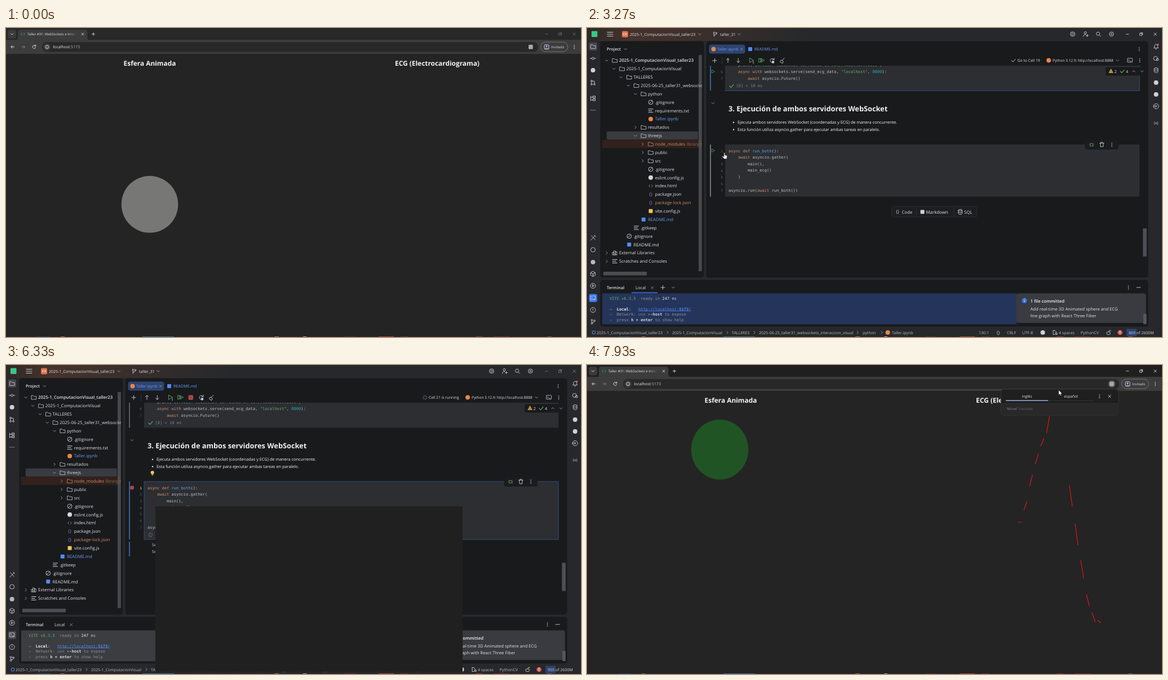
These frames come from a looping animation (1020 by 549 pixels, 8000 ms). An HTML page:

```html
<!DOCTYPE html>
<html lang="es">
<head>
<meta charset="utf-8">
<title>Taller</title>
<style>
html, body { margin: 0; width: 100%; height: 100%; overflow: hidden; background: #242424; }
svg { display: block; width: 100vw; height: 100vh; }
text { font-family: "Open Sans", "Noto Sans", sans-serif; text-rendering: geometricPrecision; white-space: pre; }
.m { font-family: "DejaVu Sans Mono", "Noto Sans Mono", monospace; }
</style>
</head>
<body>
<svg id="stage" viewBox="0 0 1020 549" preserveAspectRatio="none"></svg>
<script>
const FG = '#dfe1e5', DIM = '#ced0d6', BLUE = '#6b9bfa', ORANGE = '#cf8e6d', GREY = '#6f737a', GREEN = '#5fad65';
const EDGE = '#35619b', CELL = '#2c2e32', SELECT = '#25345a', NUM = '#5c6068';

// Drawing helpers
const R = (x, y, w, h, fill, r = 0, more = '') =>
  `<rect x="${x}" y="${y}" width="${w}" height="${h}" rx="${r}" fill="${fill}" ${more}/>`;
const P = (d, c = DIM, w = 0.9, fill = 'none', more = '') =>
  `<path d="${d}" stroke="${c}" stroke-width="${w}" fill="${fill}" stroke-linecap="round" stroke-linejoin="round" ${more}/>`;
const C = (x, y, r, fill, more = '') => `<circle cx="${x}" cy="${y}" r="${r}" fill="${fill}" ${more}/>`;
const ring = (x, y, r, c = DIM) => C(x, y, r, 'none', `stroke="${c}" stroke-width=".9"`);
const T = (x, y, s, size = 7.1, fill = FG, more = '') =>
  `<text x="${x}" y="${y}" font-size="${size}" fill="${fill}" ${more}>${s}</text>`;
const B = 'font-weight="600"', MID = 'text-anchor="middle"';
const G = (id, body, more = '') => `<g id="${id}" ${more}>${body}</g>`;
// Code line: "text|colour" runs
const M = (x, y, ...runs) => T(x, y, runs.map(r => {
  const [s, c] = r.split('|');
  return `<tspan fill="${c || '#bcbec4'}">${s}</tspan>`;
}).join(''), 7.07, FG, 'class="m"');

// Icons
const chev = (x, y, dir = 'down', c = '#9da0a8') => P({
  down: `M${x - 2.3} ${y - 1}l2.3 2.3 2.3-2.3`,
  up: `M${x - 2.3} ${y + 1}l2.3-2.3 2.3 2.3`,
  right: `M${x - 1} ${y - 2.3}l2.3 2.3-2.3 2.3`
}[dir], c);
const cross = (x, y, r, c = DIM, w = 0.8) => P(`M${x - r} ${y - r}l${2 * r} ${2 * r}m0 ${-2 * r}l${-2 * r} ${2 * r}`, c, w);
const plus = (x, y, r, c = DIM) => P(`M${x - r} ${y}h${2 * r}M${x} ${y - r}v${2 * r}`, c);
const dots = (x, y, c = DIM, gap = 2.8) => [-gap, 0, gap].map(d => C(x, y + d, 0.8, c)).join('');
const check = (x, y) => P(`M${x - 3.5} ${y}l2.5 2.6 4.6-5.2`, GREEN, 1.1);
const folder = (x, y, c = DIM) => P(`M${x - 4} ${y - 3.2}h3l1.4 1.4h4v5.2h-8.4z`, c, 0.8);
const ban = (x, y, c = DIM) => ring(x, y, 3.9, c) + P(`M${x - 2.4} ${y + 2.4}l4.8-4.8`, c);
const lines = (x, y, c = DIM) => P(`M${x - 4} ${y - 3}h8m-8 3h6m-6 3h8`, c, 1);
const shelf = (x, y) => P(`M${x - 4} ${y - 1}h2.500v4.500h-2.500zm2.500-2.500h2.800v7h-2.800zm2.800 1.500h2.500v5.500h-2.500z`, DIM, 0.8);
const braces = (x, y, c = '#a571e6') => T(x, y + 2.6, '{}', 8, c, MID);
const angle = (x, y, c = GREEN) => P(`M${x - 1.3} ${y - 2.1}l-2.2 2.1 2.2 2.1m2.6-4.2l2.2 2.1-2.2 2.1`, c);
const logo = c => (x, y) => R(x - 3.5, y - 3.5, 7, 7, c, 1);
const disc = c => (x, y) => C(x, y, 4, c);
const book = disc('#e8864a'), mark = logo('#548af7');
const db = (x, y) => P(`M${x - 3.3} ${y - 3}c0-2 6.6-2 6.6 0v6c0 2-6.6 2-6.6 0zc0 2 6.6 2 6.6 0m-6.6 3c0 2 6.6 2 6.6 0`);
const play = (x, y, r = 3.4, c = GREEN) => P(`M${x - r * .8} ${y - r}v${2 * r}l${r * 1.8} ${-r}z`, c);
const gutterPlay = y => play(223.5, y, 2.7, '#4b8a50');
const stop = (x, y, s) => R(x, y, s, s, '#a5444a', 1, 'stroke="#c75450" stroke-width=".8"');
const restart = x => P(`M${x} 56a3.500 3.500 0 1 0 .3 3M${x + .5} 53.500v2.800h-2.800`) + R(x - 3.5, 58.5, 4, 4, DIM);
const brush = x => P(`M${x} 53.500l-4 4m-3.500 2.500l4 3 2-3.500-3.500-2.500z`);
const spin = (id, x, y) => G(id, C(0, 0, 3, 'none', 'stroke="#8c9097" stroke-width="2.2" stroke-dasharray=".7 1.656"'),
  `data-at="${x},${y}"`);
const winButtons = (id, y) => G(id, P(`M956.4 ${y}h4.6M980.8 ${y - 1.4}h3.6v3.6h-3.6zm1.2-1.2h3.6v3.6`, 'currentColor', 0.8)
  + cross(1008, y, 2.3, 'currentColor'), 'color="#6f6f6f"');

// Browser window
function browser() {
  const heart = [279, 279.5, 257, 243, 214.5, 195, 176, 157.5, 143, 130.5, 121, 90, 74, 62, 56, 54, 62, 84,
    214, 251, 282, 320, 347, 379, 408, 428, 440, 456, 453.5, 458];
  let ecg = '';
  for (let i = 0; i < heart.length; i += 2)
    ecg += P(`M${765 + i * 5.04} ${heart[i]}L${770.2 + i * 5.04} ${heart[i + 1]}`, '#f01414', 1.1);
  return R(0, 0, 1020, 549, '#242424')
    + R(0, 0, 1020, 24, '#282828', 0, 'id="frame"')
    + R(3, 3, 15, 15.5, '#3a3a3a', 4) + chev(10.6, 10.7, 'down', '#eee')
    + R(0, 21, 1020, 25, '#3c3c3c')
    + `<path d="M17 21.5q4 0 4-4V8q0-5 5-5h113.500q5 0 5 5v9.500q0 4 4 4z" fill="#3c3c3c"/>`
    + angle(30, 10.7, '#2fb344')
    + T(38, 13, 'Taller #31: WebSockets e Inters', 6.05, 'url(#fade)')
    + cross(136, 10.8, 1.9, '#eee') + plus(155, 10.8, 2.5, '#ddd') + winButtons('bw', 10.8)
    + P('M14.500 33.500h-5.500m2.500-2.600l-2.600 2.600 2.600 2.600', '#e4e4e4')
    + P('M28 33.500h5.500m-2.500-2.600l2.600 2.600-2.600 2.600', '#858585')
    + P('M52.300 31.700a2.900 2.900 0 1 0 .5 2.600M52.700 30v2.200h-2.200', '#e4e4e4')
    + R(64, 25, 880, 17.5, '#282828', 8.7)
    + C(72.8, 33.7, 6.3, '#3c3c3c') + ring(72.8, 33.7, 3.1, '#ddd') + P('M72.800 33.500v1.700m0-3.200v.1', '#ddd', 0.8)
    + T(83.3, 36.2, 'localhost<tspan fill="#b5b5b5">:5173</tspan>', 7.1, '#ececec')
    + C(931, 33.5, 6.5, '#555', 'id="chip"') + R(927, 29.8, 7.6, 7.6, '#a9a9a9', 1)
    + R(948.5, 25, 48, 17, 'none', 8.5, 'stroke="#858585" stroke-width=".8"')
    + R(955, 29.7, 8, 8, 'none', 1.2, 'stroke="#b8d3f5" stroke-width="1"')
    + C(959, 32.6, 1.4, '#b8d3f5') + P('M956.500 36.700q2.500-2.700 5 0', '#b8d3f5')
    + T(967, 35.8, 'Invitado', 6.2, '#dadada') + dots(1008, 33.6, '#ddd')
    + T(255, 67.2, 'Esfera Animada', 11.9, '#f4f4f4', MID + ' font-weight="700"')
    + T(765, 67.2, 'ECG (Electrocardiograma)', 11.9, '#f4f4f4', MID + ' font-weight="700"')
    + '<ellipse id="ball"/>' + G('ecg', ecg)
    + G('popup', R(734.5, 43, 208.5, 46.500, '#1f1f1f', 5, 'stroke="#3b3b3b" stroke-width=".7"')
      + `<path d="M735 68.500h207.700V85q0 4.300-4.300 4.300H739q-4 0-4-4.300z" fill="#282828"/>` + R(735, 68, 208, .6, '#3b3b3b')
      + R(818, 63.2, 81, .6, '#444') + R(743, 62.500, 75, 1.300, '#a8c7fa')
      + T(780.5, 58, 'inglés', 6.6, '#e8e8e8', MID) + T(858.5, 58, 'español', 6.6, '#e8e8e8', MID)
      + dots(909, 55.6) + cross(927, 55.6, 2.1, '#eee')
      + T(745, 79.8, 'Mirvel <tspan fill="#666">Translate</tspan>', 6.2, '#8a8a8a'));
}

// Project tree rows: depth, arrow, icon, label, colour
const TREE = [
  [0, 'down', folder, '2025-1_ComputacionVisual_taller23'], [1, 'down', folder, '2025-1_ComputacionVisual'],
  [2, 'down', folder, 'TALLERES'], [3, 'down', folder, '2025-06-25_taller31_websockets'],
  [4, 'down', folder, 'python'], [5, '', ban, '.gitignore'], [5, '', lines, 'requirements.txt'],
  [5, '', book, 'Taller.ipynb', BLUE], [4, 'right', folder, 'resultados'], [4, 'down', folder, 'threejs'],
  [5, 'right', folder, 'node_modules <tspan fill="#7d6a60">library root</tspan>', ORANGE],
  [5, 'right', folder, 'public'], [5, 'right', folder, 'src'], [5, '', ban, '.gitignore'],
  [5, '', disc('#d5d7dc'), 'eslint.config.js'], [5, '', angle, 'index.html'], [5, '', braces, 'package.json'],
  [5, '', braces, 'package-lock.json', ORANGE], [5, '', logo('#f2c55c'), 'vite.config.js'],
  [4, '', mark, 'README.md', BLUE], [3, '', lines, '.gitkeep'], [2, '', ban, '.gitignore'],
  [2, '', mark, 'README.md'], [0, 'right', shelf, 'External Libraries'], [0, 'right', lines, 'Scratches and Consoles']
];

function tree() {
  const rows = TREE.map(([d, arrow, icon, label, c = FG], i) => {
    const x = 57 + 12.75 * d, y = 57.6 + 14.87 * i;
    return (arrow ? chev(x - 22, y, arrow) : '') + icon(x - 7.7, y, c === ORANGE && icon === folder ? c : undefined)
      + T(x, y + 2.8, label, 7.75, c, i ? '' : B);
  }).join('');
  return R(35, 183.7, 162, 14.5, '#393b40', 2) + R(27, 198.700, 176, 14.5, '#32211c')
    + G('rows', rows, 'clip-path="url(#treeClip)"')
    + R(198, 48, 5.8, 384, '#8a8d94', 0, 'opacity=".4"') + R(29, 433, 77, 6.5, '#4a4c50');
}

function stripes() {
  const left = [
    [54, (x, y) => ring(x, y, 2) + P(`M${x - 5} ${y}h3m4 0h3`)], [75, disc(DIM)],
    [97, (x, y) => ring(x - 2.500, y - 3, 1.400) + ring(x - 2.5, y + 3, 1.4) + ring(x + 2.5, y + 3, 1.4) + P(`M${x - 2.5} ${y - 1.500}v3m5 0v-4h-3`)],
    [125, (x, y) => P(`M${x - 4} ${y - 4}v8m0-6h3m-3 5h3`) + R(x, y - 4, 4, 3, 'none', 0, `stroke="${DIM}"`) + R(x, y + 1, 4, 3, 'none', 0, `stroke="${DIM}"`)],
    [146, (x, y) => [-3.3, 0, 3.3].map(d => C(x + d, y, 0.8, DIM)).join('')],
    [373, (x, y) => P(`M${x - 4} ${y + 4}l8-8m-7 0l7 7m-2-8l3 3`)], [394, (x, y) => ring(x, y, 4)],
    [416, disc('#b4b8bf')], [437, (x, y) => P(`M${x} ${y - 4.5}l4 2.200v4.600l-4 2.200-4-2.200v-4.600zm-4 2.200l4 2.300 4-2.300m-4 2.300v4.500`)],
    [458, (x, y) => ring(x, y, 4.5) + P(`M${x - 1} ${y - 2}v4l3-2z`)],
    [501, (x, y) => ring(x, y, 4.5) + P(`M${x} ${y - 2.300}v2.600m0 2v.1`)],
    [522, (x, y) => ring(x - 2, y - 3, 1.4) + ring(x + 2.500, y - 2, 1.4) + ring(x - 2, y + 3, 1.4) + P(`M${x - 2} ${y - 1.500}v3q4.500 0 4.500-2`)]
  ];
  const right = [
    [33, (x, y) => P(`M${x - 4} ${y + 2.500}h8l-1.300-2v-2.500q-2.700-4-5.400 0v2.500zm3 2h2`) + C(x + 3, y - 3.500, 1.8, '#e55765')],
    [54, (x, y) => ring(x - 1, y, 3.5) + ring(x + 2.5, y + 2, 2)], [75, db], [97, disc(DIM)], [118, disc(DIM)],
    [139, (x, y) => ring(x, y, 4.5) + P(`M${x - 5} ${y}h6m-2-2l2 2-2 2`)],
    [168, (x, y) => T(x, y + 2.5, '(x)', 7, DIM, MID)]
  ];
  return R(3.5, 25.500, 14.5, 14.5, '#45474c', 3) + folder(10.8, 33)
    + left.map(([y, f]) => f(10.6, y)).join('') + right.map(([y, f]) => f(1009.5, y)).join('')
    + R(3.5, 472.500, 14.5, 14.5, '#3574f0', 3, 'id="termTab"')
    + P('M6.700 476h8v7h-8zm1.600 2l1.600 1.500-1.600 1.500m3 .5h2');
}

function header() {
  return R(0, 0, 1020, 23, 'url(#warm)')
    + R(8, 5.5, 10.5, 10.5, '#35c88a', 1) + P('M36 7.500h10m-10 3.500h10m-10 3.500h10', DIM, 1)
    + R(62, 5.5, 11, 11, '#e0704e', 2) + T(67.5, 13.2, 'CV', 5.8, '#fff', B + ' ' + MID)
    + T(76, 13.7, '2025-1_ComputacionVisual_taller23', 7, FG) + chev(200, 11)
    + ring(225.300, 8.400, 1.2) + ring(229.500, 9, 1.2) + P('M225.300 9.600v5.500m0-2.500q4.200 0 4.200-2.400')
    + T(236, 13.7, 'taller_31', 7) + chev(270, 11)
    + ring(861.5, 10.8, 4) + ring(861.5, 10.8, 1.8)
    + ring(884, 8.500, 2) + P('M880.500 15q0-3.500 4-3.500m3 0v4m-2-2h4')
    + ring(906.5, 10.2, 3) + P('M908.800 12.500l2.500 2.500') + ring(930.3, 10.8, 3.8) + ring(930.3, 10.8, 1.4) + winButtons('iw', 11);
}

function editor() {
  const nums = (y, list) => list.map((n, i) => T(240.8, y + 11.67 * i, n, 6, NUM, 'text-anchor="end" class="m"')).join('');
  return R(217, 30, 63, 15, '#2e436e', 3, 'stroke="#35538f" stroke-width=".7"') + book(224.5, 37.5)
    + T(231, 40.3, 'Taller.ipynb', 7, BLUE) + cross(274.2, 37.6, 1.9, '#9da0a8')
    + mark(289.5, 37.6) + T(297, 40.3, 'README.md', 7.2, BLUE) + dots(979.5, 37.5)
    + plus(226.5, 57.8, 3.6) + R(239, 51, .7, 13, '#393b40')
    + P('M250 61.500v-7.500m-2.600 2.600l2.600-2.600 2.600 2.600M268.300 54v7.500m-2.600-2.600l2.600 2.600 2.600-2.600')
    + play(291.500, 57.6, 3.8) + P('M295 59v4', DIM, .8) + play(307.500, 57.6) + play(311, 57.6)
    + G('toolIdle', restart(331.5) + brush(350) + check(756.500, 57.6) + T(763.500, 60.2, 'Go to Cell 19', 6.8))
    + G('toolRun', stop(324, 54, 7.5) + restart(349.5) + brush(368) + spin('spinA', 743.5, 57.6) + T(750, 60.2, 'Cell 21 is running', 6.7))
    + book(819, 57.6) + T(826, 60.2, 'Python 3.12.9: http://localhost:8888', 6.5) + chev(941, 57.6)
    + R(958.5, 53.8, 9, 7, 'none', 1, `stroke="${DIM}" stroke-width=".8"`) + P('M960.500 56l1.500 1.400-1.500 1.400m3 .3h2') + dots(980.5, 57.6)
    // previous cell
    + R(245, 67, 735, 44.5, CELL) + R(218, 67, 2, 44.5, GREY, 0, 'id="barPrev"')
    + G('prevActive', P('M245 111.500h735V67', EDGE, .7) + gutterPlay(77.5))
    + `<g clip-path="url(#codeClip)">${M(268, 68.400, 'print(', '"Servidor WebSocket corriendo en ws://localhost:8800"|#6aab73', ')')}</g>`
    + nums(80, [6, 7])
    + M(268, 80, 'async with|' + ORANGE, ' websockets.serve(send_ecg_data, ', '"localhost"|#6aab73', ', ', '8800|#2aacb8', '):')
    + M(285, 91.8, 'await|' + ORANGE, ' asyncio.Future()') + check(256.5, 103) + M(264.5, 105.3, '[8] &lt; 10 ms|#7a7e85')
    + R(920, 69.500, 71, 15, '#191a1c', 3) + P('M929.600 73l3.500 6.600h-7z', '#f2c55c', .7, '#a88636') + T(935.5, 79.8, '2', 7.2)
    + check(949.500, 77) + T(956, 79.8, '4', 7.2) + chev(970, 77, 'up') + chev(984.5, 77)
    // markdown cell
    + chev(223.5, 133.5)
    + T(251, 147.7, '3. Ejecución de ambos servidores WebSocket', 12.77, '#f0f1f3', 'font-weight="700"')
    + C(260, 167.7, 1.2, FG) + C(260, 180.5, 1.2, FG)
    + T(267, 170.2, 'Ejecuta ambos servidores WebSocket (coordenadas y ECG) de manera concurrente.', 7.34, '#f4f5f7')
    + T(267, 183, 'Esta función utiliza asyncio.gather para ejecutar ambas tareas en paralelo.', 7.34, '#f4f5f7')
    // active cell
    + R(245, 207, 735, 92.5, CELL, 0, `id="cell" stroke="${EDGE}" stroke-width=".7"`) + R(218, 207, 2, 92.5, GREY, 0, 'id="bar"')
    + G('playIcon', gutterPlay(218)) + G('stopIcon', stop(220.8, 215.2, 5.6))
    + nums(220.5, [1, 2, 3, 4, 5, 6, 7]) + T(240.8, 220.5, '1', 6, FG, 'text-anchor="end" class="m" id="current"')
    + M(251, 220.5, 'async def |' + ORANGE, 'run_both|#56a8f5', '():') + M(268, 232.3, 'await|' + ORANGE, ' asyncio.gather(')
    + M(285, 243.8, 'main(),') + M(285, 255.4, 'main_ecg()') + M(268, 267.2, ')')
    + M(251, 290.6, 'asyncio.run(', 'await|' + ORANGE, ' run_both())')
    + R(883.5, 199, 59.5, 17, '#1b1c1f', 4)
    + C(895, 207.500, 2.5, 'none', `stroke="${GREEN}" stroke-width=".8"`)
    + P('M891.500 204.500l1.500 1.200m4 0l1.500-1.200m-7.300 3h1.300m5 0h1.300m-7 3l1.500-1.200m4 0l1.500 1.200', GREEN, .7)
    + P('M909.500 204.500h7.500m-6.500 0l.6 6.500h4.400l.6-6.500m-4.500-1.500h3') + dots(931, 207.300)
    + G('running', spin('spinB', 256.3, 301.7) + T(267.5, 304, '', 7.07, '#8c9097', 'class="m" id="clock"'))
    + G('output', R(218, 314, 2, 26, EDGE) + M(258.700, 322.2, 'Servidor WebSocket corriendo en ws://localhost:8700')
      + M(258.700, 333.8, 'Servidor WebSocket corriendo en ws://localhost:8800')
      + C(259.700, 191, 3.1, '#f2c55c') + R(258.200, 193.5, 3, 3, '#b08d4a', 1))
    + G('adders', R(540.5, 317, 151, 19, '#1d1e21', 3, 'stroke="#2f3135" stroke-width=".7"')
      + P('M584.500 319v15m66-15v15', '#34363a', .7)
      + braces(551, 326.7, DIM) + T(558.500, 329.500, 'Code', 7.7) + R(591.5, 323.2, 7, 7, DIM, 1)
      + T(601.5, 329.5, 'Markdown', 7.9) + db(662, 326.7) + T(669, 329.5, 'SQL', 7.7))
    + R(986.2, 356, 6.6, 50, '#4d4f54', 0, 'id="thumb"');
}

function terminal() {
  return T(35, 464.3, 'Terminal', 7.4, FG, B) + T(86, 464.3, 'Local', 7.6)
    + R(79, 469.5, 46, 1.600, '#3574f0', 0, 'id="tabLine"') + cross(115.7, 461.5, 1.9, '#9da0a8')
    + G('termTools', plus(134.5, 461, 3.5) + chev(153, 461)) + dots(960.5, 461) + P('M975 461h7')
    + R(27, 471.5, 735, 55, SELECT, 0, 'id="termBg"')
    + M(40, 482.5, 'VITE|#5fad65', ' v6.3.5|#5fad65', '  ready in |#8c9097', '247|#e8e9eb', ' ms|#bcbec4')
    + M(40, 501.5, '→  |#5fad65', '<tspan font-weight="700">Local</tspan>|#f0f1f3', ':   ', '<tspan text-decoration="underline">http://localhost:<tspan font-weight="700">5173</tspan>/</tspan>|#4f8ff7')
    + M(40, 511, '→  |#4c8a52', 'Network|#8c9097', ': use |#7a7e85', '<tspan font-weight="700">--host</tspan>|#d4d6da', ' to expose|#8c9097')
    + M(40, 520.8, '→  |#4c8a52', 'press |#8c9097', '<tspan font-weight="700">h + enter</tspan>|#d4d6da', ' to show help|#8c9097')
    + R(761.5, 471.500, 230, 52.5, '#393b40', 4) + R(987, 508, 5.500, 18, '#55585e')
    + C(776, 484.2, 4.6, '#3574f0') + P('M776 484v2.500m0-4.800v.1', '#fff', 1)
    + T(786.5, 488, '1 file committed', 7.7, '#f0f1f3', B)
    + T(786.5, 501.8, 'Add real-time 3D Animated sphere and ECG', 7.65) + T(786.5, 513.8, 'line graph with React Three Fiber', 7.65);
}

function status() {
  const crumbs = [[17, '2025-1_ComputacionVisual_taller23'], [151, '2025-1_ComputacionVisual'], [257, 'TALLERES'],
    [305, '2025-06-25_taller31_websockets_interaccion_visual'], [489, 'python'], [541, 'Taller.ipynb']];
  return R(9.5, 538.5, 5, 5, 'none', 1, `stroke="${BLUE}" stroke-width="1"`)
    + crumbs.map(([x, s]) => T(x, 543.7, s, 7.05, '#b4b8bf')).join('')
    + [143, 249, 297, 480, 523].map(x => chev(x, 541, 'right')).join('') + book(533.5, 541)
    + T(695, 543.7, '130:1', 7.1, '#b4b8bf', 'id="caretPos"') + braces(729.5, 541, DIM) + T(745, 543.7, 'CRLF', 7.1, '#b4b8bf')
    + T(772, 543.7, 'UTF-8', 7.1, '#b4b8bf') + C(808.5, 541, 4, DIM) + P('M827 537.500h3l2 2v2m-5-4v7h2.500m2-2.500h2.500v2.500h-2.500z')
    + T(837, 543.7, '4 spaces', 7, '#b4b8bf') + T(875.5, 543.7, 'PythonCV', 7.2, '#b4b8bf')
    + R(922, 540, 6, 4.5, 'none', 1, `stroke="${DIM}" stroke-width=".8"`) + P('M926 540v-2q1.700-2 3.400 0')
    + C(945.5, 541, 4.3, '#db5c5c') + P('M945.500 538.700v2.500m0 1.900v.1', '#fff', 1)
    + R(957, 534.5, 18, 13, '#2d4371') + T(961, 543.7, '', 7, '#ced0d6', 'id="heap"');
}

function ide() {
  const panel = 'stroke="#303236" stroke-width=".5"';
  return R(0, 0, 1020, 549, '#26282b') + header() + R(23, 23, 185, 421, '#191a1c', 5, panel) + R(211, 23, 785, 421, '#191a1c', 5, panel)
    + R(23, 447, 973, 84, '#191a1c', 5, panel) + T(35, 40.3, 'Project', 7.4, FG, B) + chev(68.5, 37.5)
    + tree() + stripes() + editor() + terminal() + status();
}

// Thin sliver of the desktop along the lower edge
function sliver() {
  const bits = [[54, 24, '#2c3d63'], [97, 7, '#a8683c'], [242, 56, '#41688f'], [476, 8, '#b07040'], [527, 6, '#b8a090'],
    [600, 20, '#6e2424'], [661, 27, '#c0452c'], [700, 14, '#7a2a2a'], [833, 12, '#a03030'], [865, 28, '#7c2830'], [960, 8, '#8c4a40']];
  return R(0, 548, 1020, 1, '#33202c') + bits.map(([x, w, c]) => R(x, 548, w, 1, c)).join('');
}

const stage = document.getElementById('stage');
stage.innerHTML = `<defs>
  <linearGradient id="fade"><stop offset=".82" stop-color="#e4e4e4"/><stop offset="1" stop-color="#e4e4e4" stop-opacity="0"/></linearGradient>
  <linearGradient id="warm"><stop offset="0" stop-color="#2f2826"/><stop offset=".08" stop-color="#46332c"/><stop offset=".4" stop-color="#26282b"/></linearGradient>
  <clipPath id="treeClip"><rect x="24" y="48" width="180" height="385"/></clipPath>
  <clipPath id="codeClip"><rect x="245" y="67" width="735" height="44"/></clipPath></defs>`
  + G('ide', ide()) + G('browser', browser()) + R(0, 0, 1020, 549, '#202020', 0, 'id="ghost"') + sliver()
  + G('cursor', G('arrow', P('M0 0v8.800l2-1.800 1.400 3.100 1.400-.6-1.400-3h2.700z', '#111', .5, '#fff'))
    + G('hand', P('M-.7 0q.8-1 1.600 0v3.700l3.200.8q1 .4.8 1.500l-.7 4.600h-4.700l-2.800-4q.2-1.500 1.500-.7l1.100.9z', '#111', .5, '#fff'))
    + G('beam', P('M-1.900-4q1.500 0 1.900.7q.4-.7 1.900-.7M0-3.300v6.800M-1.900 4.200q1.500 0 1.900-.7q.4.7 1.900.7', '#e6e6e6', .9)));

const els = {};
stage.querySelectorAll('[id]').forEach(e => els[e.id] = e);
const set = (id, attrs) => { for (const k in attrs) els[id].setAttribute(k, attrs[k]); };
const show = (id, on) => els[id].setAttribute('display', on ? 'inline' : 'none');
const clamp = k => Math.max(0, Math.min(1, k));
const mix = (a, b, k) => a + (b - a) * k;
const ease = k => k * k * (3 - 2 * k);

// Pointer stops: time, x, y
const PATH = [[270, 955, 510], [400, 491, 286], [800, 491, 286], [900, 487, 279], [1000, 490.5, 286], [1730, 490.5, 286],
  [2200, 965, 23], [2400, 958, 10], [2750, 958, 10], [3270, 243.6, 222], [3440, 243.6, 222], [3670, 224, 216],
  [4670, 224, 216], [5200, 341.8, 349], [5530, 341.8, 349], [6000, 150, 549], [6360, 150, 549], [6470, 210.7, 110.6],
  [6600, 210.7, 110.6], [7000, 50, 33], [7300, 50, 33], [7930, 836.7, 44.5], [8000, 836.7, 44.5]];

function pointer(t) {
  const i = PATH.findIndex(p => p[0] > t), a = PATH[i - 1], b = PATH[i];
  const k = ease((t - a[0]) / (b[0] - a[0]));
  return [mix(a[1], b[1], k), mix(a[2], b[2], k)];
}

function draw(t) {
  const running = t >= 4250, focused = t < 4100, back = t >= 6400;
  show('browser', t < 2600 || back);
  show('ide', t >= 2600 && !back);

  const closing = t >= 2600 && t < 2740, opening = t >= 6300 && t < 6400;
  show('ghost', closing || opening);
  const k = closing ? 1 - (t - 2600) / 140 : clamp((t - 6350) / 50);
  set('ghost', { x: mix(265, 0, k), y: mix(251, 0, k), width: mix(545, 1020, k), height: mix(294, 549, k), opacity: closing ? k : 1 });

  // browser
  set('frame', { fill: t < 2480 ? '#282828' : '#1f1f1f' });
  set('bw', { color: t < 2480 ? '#6f6f6f' : '#e8e8e8' });
  show('popup', t >= 7600);
  show('chip', t >= 7600);
  const live = t >= 7430, a = -0.12 - (7930 - t) / 1000;
  set('ball', live
    ? { cx: 255 + 164 * Math.sin(a), cy: 313 - 164 * Math.cos(a), rx: 50.5 + 2 * Math.abs(Math.sin(a)), ry: 50.5 + 2.8 * Math.cos(a), fill: '#205425' }
    : { cx: 255, cy: 313.3, rx: 50.3, ry: 50.5, fill: '#777776' });
  const drawn = Math.floor((t - 7430) / 33);
  [...els.ecg.children].forEach((s, i) => s.setAttribute('display', i < drawn ? 'inline' : 'none'));

  // editor
  set('iw', { color: t < 6100 ? '#dfe1e5' : '#85878c' });
  ['toolRun', 'stopIcon', 'running'].forEach(id => show(id, running));
  ['toolIdle', 'playIcon'].forEach(id => show(id, !running));
  const output = t >= 4700, h = running ? 103 : 92.5;
  show('output', output);
  set('cell', { height: h, 'stroke-opacity': focused ? 0 : 1 });
  set('bar', { height: h, fill: focused ? GREY : EDGE });
  set('barPrev', { fill: focused ? EDGE : '#5a5d63' });
  show('prevActive', focused);
  show('current', !focused);
  set('adders', { transform: `translate(0 ${output ? 40.4 : running ? 10.5 : 0})` });
  set('thumb', { y: output ? 351.5 : 356 });
  ['spinA', 'spinB'].forEach(id => set(id, { transform: `translate(${els[id].dataset.at}) rotate(${Math.floor(t / 125) * 45})` }));
  const ms = Math.max(0, Math.floor((t - 4250) / 10) * 10);
  els.clock.textContent = (ms >= 1000 ? `${Math.floor(ms / 1000)}s ` : '') + `${ms % 1000}ms`;
  show('termTools', focused);
  show('tabLine', focused);
  set('termBg', { fill: focused ? SELECT : '#3b3d41' });
  set('termTab', { fill: focused ? '#3574f0' : '#45474c' });
  els.caretPos.textContent = focused ? '130:1' : '143:1';
  els.heap.textContent = (t < 5900 ? 869 : 955) + ' of 2600M';

  // pointer
  show('cursor', t >= 270);
  if (t >= 270) set('cursor', { transform: `translate(${pointer(t)})` });
  const kind = t >= 3150 && t < 4800 ? 'hand' : t >= 4800 && t < 5700 ? 'beam' : 'arrow';
  ['arrow', 'hand', 'beam'].forEach(id => show(id, id === kind));
}

const start = performance.now();
function tick() {
  draw((performance.now() - start) % 8000);
  requestAnimationFrame(tick);
}
tick();
</script>
</body>
</html>
```
